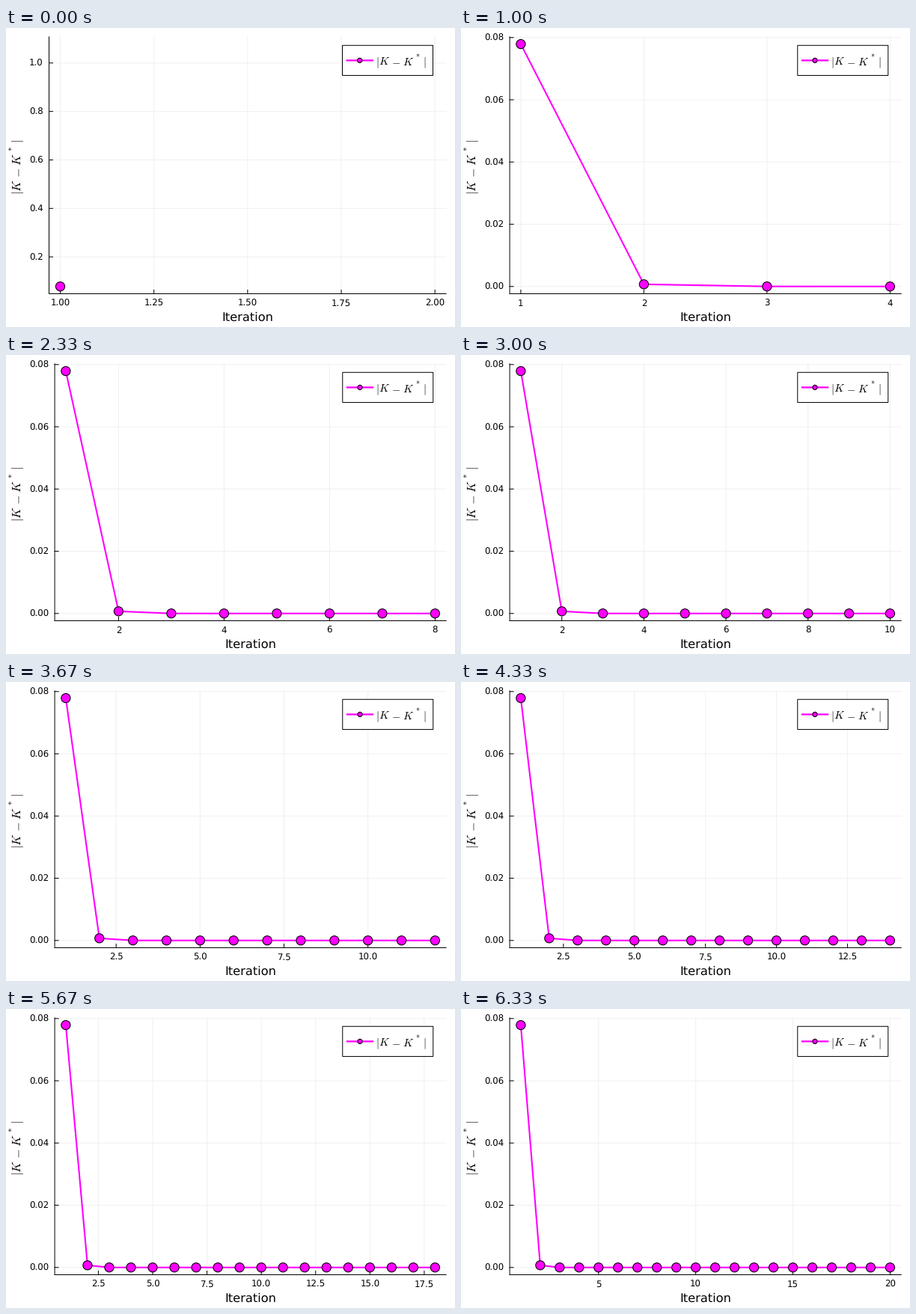
Write a matplotlib script that moves like this. It is 600 px wide and 400 px high and loops after 6.66 s.

```python
import numpy as np
import matplotlib
import matplotlib.pyplot as plt
from matplotlib.animation import FuncAnimation
from matplotlib.patches import Circle, Rectangle

matplotlib.rcParams.update({
    "font.family": "DejaVu Sans",
    "mathtext.fontset": "cm",
    "text.hinting": "none",
    "path.snap": False,
})

W, H, DPI = 600, 400, 100
PT = 72 / DPI                      # points per pixel
COUNT, INTERVAL = 20, 333
TOP, RIGHT, BOTTOM = 11.8, 588.2, 355.5
PAD = 0.03                         # widening of the axis limits
INSET = 1 / 30                     # legend distance from the plot corner
MAGENTA = "#ff00ff"
TICK_PX, GUIDE_PX, LEGEND_PX = 11.8, 16.2, 14.7

ERRORS = np.zeros(COUNT)
ERRORS[:3] = 0.0779, 0.0007, 0.00001

# Tick spacing on the x axis for 1, 2, ... 20 points
STEPS = ([0.25] * 2 + [0.5] + [1] * 4 + [2] * 4 + [2.5] * 3
         + [2] + [3] * 2 + [2.5] * 2 + [5])

fig = plt.figure(figsize=(W / DPI, H / DPI), dpi=DPI, facecolor="white")
ax = fig.add_axes([0, 0, 1, 1])


def line(xs, ys, color="black", width=1.0, **kw):
    ax.plot(xs, ys, color=color, lw=width * PT, **kw)


def dots(xs, ys, radius, z):
    for x, y in zip(xs, ys):
        ax.add_patch(Circle((x, y), radius, fc=MAGENTA, ec="black",
                            lw=1.05 * PT, zorder=z))


def label(x, y, s, px, **kw):
    kw.setdefault("va", "baseline")
    ax.text(x, y, s, fontsize=px * PT, color="black", zorder=8, **kw)


def formula(x, y, px, vertical=False):
    """Draw |K - K*| from its baseline origin, along x or upwards."""
    parts = [("$|K$", 0, 0, 1, "left"),
             ("$-$", 1.81, 0, 1, "center"),
             ("$K$", 2.42, 0, 1, "left"),
             (r"$\ast$", 3.78, 0.69, 0.7, "center"),
             ("$|$", 4.39, 0, 1, "center")]
    for s, along, rise, scale, ha in parts:
        a, r = along * px, rise * px
        px_x, px_y = (x - r, y - a) if vertical else (x + a, y - r)
        label(px_x, px_y, s, px * scale, ha=ha,
              rotation=90 if vertical else 0, rotation_mode="anchor")


def mapper(lo, hi, start, end):
    """Map data to pixels with the limits widened on both sides."""
    span = hi - lo
    a, b = lo - PAD * span, hi + PAD * span
    return lambda v: start + (v - a) / (b - a) * (end - start)


def ticks(lo, hi, step):
    span = hi - lo
    first = int(np.ceil((lo - PAD * span) / step))
    last = int(np.floor((hi + PAD * span) / step))
    return np.arange(first, last + 1) * step


def decimals(step):
    return next(d for d in range(3) if abs(step * 10**d % 1) < 1e-9)


def draw_axes(left, fx, fy, xt, yt, xdec, ydec):
    for v in xt:
        x = fx(v)
        line([x, x], [TOP, BOTTOM], "0.94", zorder=1)
        line([x, x], [BOTTOM, BOTTOM - 5], zorder=2)
        label(x, 371.5, f"{v:.{xdec}f}", TICK_PX, ha="center")
    for v in yt:
        y = fy(v)
        line([left, RIGHT], [y, y], "0.94", zorder=1)
        line([left, left + 5], [y, y], zorder=2)
        label(left - 8, y + 4.3, f"{v:.{ydec}f}", TICK_PX, ha="right")
    line([left, left], [TOP, BOTTOM], zorder=2)
    line([left, RIGHT], [BOTTOM, BOTTOM], zorder=2)
    label((left + RIGHT) / 2, 392.2, "Iteration", GUIDE_PX, ha="center")
    formula(20, 223.2, GUIDE_PX, vertical=True)


def draw_legend(left):
    w, h = 121, 40.2
    x = RIGHT - (RIGHT - left) * INSET - w
    y = TOP + (BOTTOM - TOP) * INSET
    mid = y + h / 2
    ax.add_patch(Rectangle((x, y), w, h, fc="white", ec="black",
                           lw=PT, zorder=6))
    line([x + 5, x + 41.5], [mid, mid], MAGENTA, 2.3, zorder=7,
         solid_capstyle="butt")
    dots([x + 23.2], [mid], 3.1, 7.5)
    formula(x + 44.7, mid + 6.3, LEGEND_PX)


def draw(i):
    n = i + 1
    ax.clear()
    ax.set_xlim(0, W)
    ax.set_ylim(H, 0)
    ax.axis("off")

    single = n == 1
    left = 57.5 if single else 65.1
    xs, ys = np.arange(1, n + 1), ERRORS[:n]
    x_lim = (1, max(n, 2))
    y_lim = (ys[0], ys[0] + 1) if single else (ys.min(), ys.max())
    x_step, y_step = STEPS[i], 0.2 if single else 0.02

    fx = mapper(*x_lim, left, RIGHT)
    fy = mapper(*y_lim, BOTTOM, TOP)
    draw_axes(left, fx, fy, ticks(*x_lim, x_step), ticks(*y_lim, y_step),
              decimals(x_step), 1 if single else 2)
    line(fx(xs), fy(ys), MAGENTA, 2.1, zorder=3)
    dots(fx(xs), fy(ys), 6.1, 4)
    draw_legend(left)
    return []


anim = FuncAnimation(fig, draw, frames=COUNT, init_func=lambda: [],
                     interval=INTERVAL, repeat=True, repeat_delay=0)
plt.show()
```
